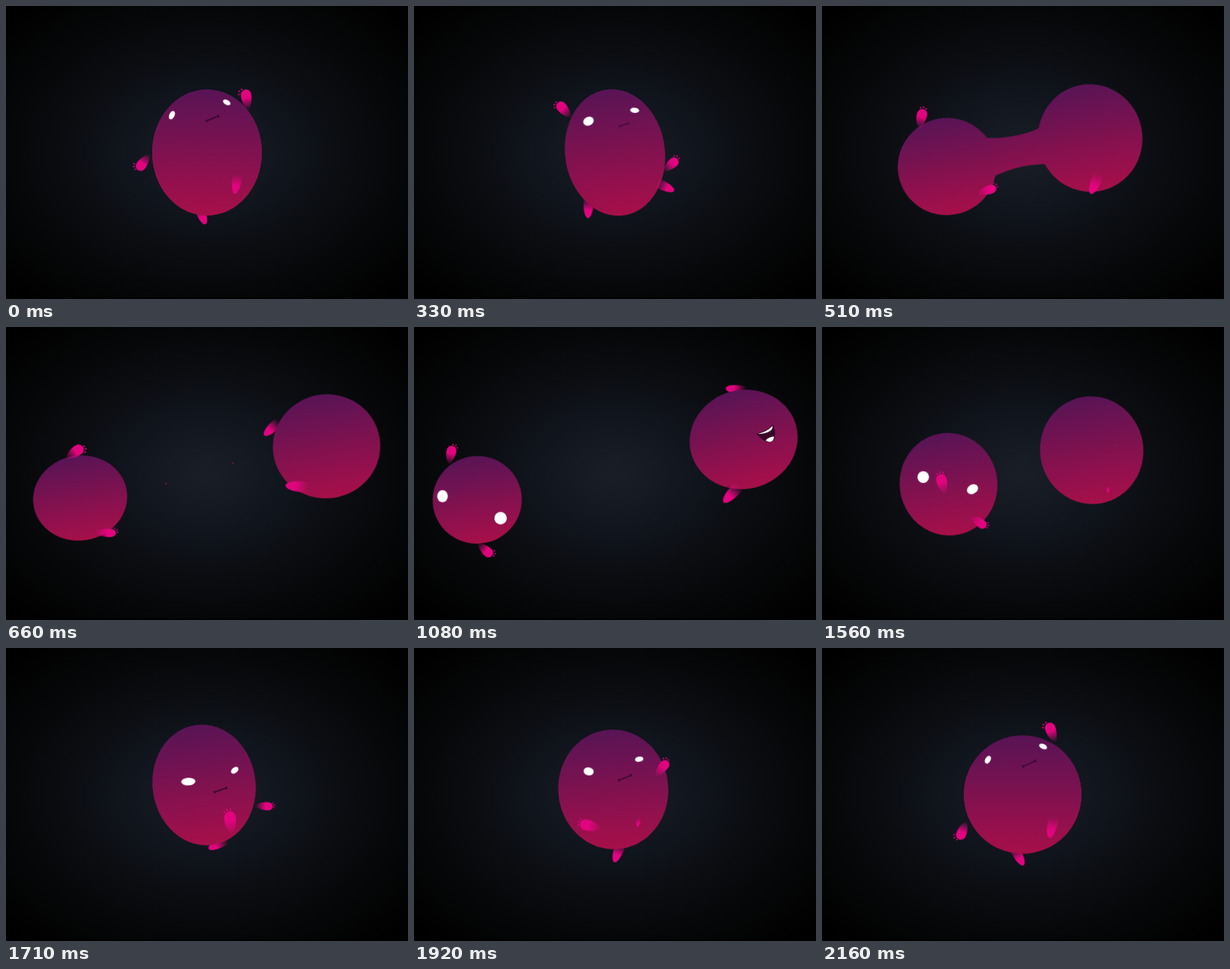
An HTML page without scripts that plays this animation: 550x400 px, repeating every 2190 ms.

```html
<!DOCTYPE html>
<html lang="en">
<head>
<meta charset="utf-8">
<title>Splitting blob</title>
<style>
html, body { margin: 0; width: 100%; height: 100%; overflow: hidden; background: #000; }
svg { display: block; width: 550px; height: 400px;
  background: radial-gradient(ellipse farthest-corner at 50% 50%, #1a1e27 0, #10141c 30%, #0b0d11 48%, #050607 72%, #000 95%); }
svg * { animation: 2.19s linear infinite; }

.left { animation-name: left; }
.right { animation-name: right; }
.bodyL { animation-name: bodyL; }
.bodyR { animation-name: bodyR; }
.arm1 { animation-name: arm1; }
.arm2 { animation-name: arm2; }
.toes1 { animation-name: toes1; }
.toes2 { animation-name: toes2; }
.leg1 { animation-name: leg1; }
.leg2 { animation-name: leg2; }
.eye1 { animation-name: eye1; }
.eye2 { animation-name: eye2; }
.line { animation-name: line; }
.grin { animation-name: grin; }
.drop { animation-name: drop; }

/* blob paths */
@keyframes left {
  0%, 15.07% { transform: translate(275px, 200px); }
  19.18% { transform: translate(258px, 203px); }
  21.92% { transform: translate(203px, 213px); }
  24.66% { transform: translate(141px, 225px); }
  27.4% { transform: translate(114px, 231px); }
  30.14% { transform: translate(101.5px, 233.5px); animation-timing-function: ease-out; }
  49.32% { transform: translate(86.5px, 236px); }
  64.38% { transform: translate(82.5px, 237px); }
  68.49% { transform: translate(102px, 232px); }
  71.23% { transform: translate(172px, 215px); }
  73.97% { transform: translate(236px, 196px); }
  78.08% { transform: translate(271px, 187px); }
  98.63%, 100% { transform: translate(274.5px, 200px); }
}
@keyframes right {
  0%, 15.07% { transform: translate(275px, 200px); }
  19.18% { transform: translate(289px, 197px); }
  21.92% { transform: translate(336px, 187px); }
  24.66% { transform: translate(396px, 174px); }
  27.4% { transform: translate(425px, 167px); }
  30.14% { transform: translate(438.5px, 163px); animation-timing-function: ease-out; }
  49.32% { transform: translate(451px, 153.5px); }
  64.38% { transform: translate(456px, 150.5px); }
  68.49% { transform: translate(437px, 154px); }
  71.23% { transform: translate(370px, 168px); }
  73.97% { transform: translate(311px, 181px); }
  78.08% { transform: translate(271px, 187px); }
  98.63%, 100% { transform: translate(274.5px, 200px); }
}

/* body shapes */
@keyframes bodyL {
  0% { transform: rotate(0deg) scale(.75, .86); }
  15.07% { transform: rotate(-8deg) scale(.68, .865); }
  21.92% { transform: rotate(-10deg) scale(.68, .68); }
  30.14% { transform: rotate(-10deg) scale(.645, .58); }
  49.32%, 64.38% { transform: rotate(-10deg) scale(.61, .598); }
  73.97% { transform: rotate(-10deg) scale(.69, .74); }
  78.08% { transform: rotate(-8deg) scale(.702, .823); }
  98.63%, 100% { transform: rotate(0deg) scale(.805, .805); }
}
@keyframes bodyR {
  0% { transform: rotate(0deg) scale(.75, .86); }
  15.07% { transform: rotate(-8deg) scale(.68, .865); }
  21.92% { transform: rotate(-10deg) scale(.71, .74); }
  30.14% { transform: rotate(-10deg) scale(.735, .71); }
  49.32% { transform: rotate(-14deg) scale(.742, .675); }
  64.38% { transform: rotate(-12deg) scale(.722, .674); }
  73.97% { transform: rotate(-10deg) scale(.7, .76); }
  78.08% { transform: rotate(-8deg) scale(.702, .823); }
  98.63%, 100% { transform: rotate(0deg) scale(.805, .805); }
}

/* limbs, measured from the blob centre */
@keyframes arm1 {
  0% { transform: translate(-79px, 2px) rotate(-145deg) scale(.95); }
  15.07% { transform: translate(-60px, -48px) rotate(-43deg) scale(.95); }
  30.14% { transform: translate(-19.5px, -53.5px) rotate(54deg) scale(1); }
  49.32% { transform: translate(-38.5px, -48px) rotate(10deg) scale(.92); }
  64.38% { transform: translate(-46.5px, -41px) rotate(-28deg) scale(.88); }
  78.08% { transform: translate(38px, 68px) rotate(-5deg) scale(1.12); }
  98.63%, 100% { transform: translate(-77.5px, 36px) rotate(-160deg) scale(.95); }
}
@keyframes arm2 {
  0% { transform: translate(57px, -58px) rotate(-10deg) scale(1); }
  15.07% { transform: translate(67px, 26px) rotate(47deg) scale(.9); }
  30.14% { transform: translate(19px, 47.5px) rotate(90deg) scale(.8, 1.05); }
  49.32% { transform: translate(.5px, 60px) rotate(129deg) scale(.9); }
  64.38% { transform: translate(-9.5px, 60px) rotate(155deg) scale(.9); }
  78.08% { transform: translate(69px, 29px) rotate(91deg) scale(.78, .88); }
  98.63%, 100% { transform: translate(45.5px, -71px) rotate(-22deg) scale(1); }
}
@keyframes toes1 {
  0% { transform: translateY(-20px) rotate(44deg); }
  15.07% { transform: translateY(-20px) rotate(-29deg); }
  30.14%, 64.38% { transform: translateY(-20px) rotate(27deg); }
  78.08% { transform: translateY(-20px) rotate(-15deg); }
  98.63%, 100% { transform: translateY(-20px) rotate(41deg); }
}
@keyframes toes2 {
  0% { transform: translateY(-20px) rotate(-48deg); }
  15.07% { transform: translateY(-20px) rotate(-17deg); }
  30.14%, 64.38% { transform: translateY(-20px) rotate(-28deg); }
  78.08% { transform: translateY(-20px) rotate(-11deg); }
  98.63%, 100% { transform: translateY(-20px) rotate(-36deg); }
}
@keyframes leg1 {
  0% { transform: translate(-12px, 72px) rotate(159deg); }
  15.07% { transform: translate(-36px, 62px) rotate(182deg); }
  30.14% { transform: translate(-65px, -34px) rotate(227deg); }
  49.32% { transform: translate(3px, -66px) rotate(278deg); }
  64.38% { transform: translate(31px, -61px) rotate(321deg); }
  78.08% { transform: translate(31px, 74px) rotate(242deg); }
  98.63%, 100% { transform: translate(-12px, 72px) rotate(152deg); }
}
@keyframes leg2 {
  0% { transform: translate(42px, 30px) rotate(189deg) scale(.95); }
  15.07% { transform: translate(57px, 41px) rotate(115deg) scale(.95); }
  30.14% { transform: translate(-25px, 56px) rotate(275deg) scale(1.12); }
  49.32% { transform: translate(-6px, 63px) rotate(223deg) scale(1.12); }
  64.38% { transform: translate(6px, 61px) rotate(188deg) scale(1.08); }
  73.97%, 80% { transform: translate(30px, 45px) rotate(190deg) scale(0); }
  98.63%, 100% { transform: translate(42.5px, 32px) rotate(192deg) scale(1); }
}

/* faces */
@keyframes eye1 {
  0% { transform: translate(-48px, -51px) rotate(25deg) scale(.36, .61); }
  15.07% { transform: translate(-36px, -43px) rotate(-25deg) scale(.75, .6); }
  22%, 34% { transform: translate(-52px, -12px) rotate(-10deg) scale(0, 0); }
  49.32% { transform: translate(-47.5px, -5px) rotate(0deg) scale(.73, .83); }
  64.38% { transform: translate(-48px, -15px) rotate(17deg) scale(.6, 1.08); }
  78.08% { transform: translate(-21.5px, -4.5px) rotate(-3deg) scale(.97, .53); }
  98.63%, 100% { transform: translate(-47.5px, -47.5px) rotate(28deg) scale(.37, .58); }
}
@keyframes eye2 {
  0% { transform: translate(27px, -68.5px) rotate(30deg) scale(.55, .33); }
  15.07% { transform: translate(27px, -58px) rotate(5deg) scale(.62, .36); }
  22%, 34% { transform: translate(38px, 5px) rotate(0deg) scale(0, 0); }
  49.32% { transform: translate(32px, 25px) rotate(0deg) scale(.85, .85); }
  64.38% { transform: translate(23.5px, 34px) rotate(-25deg) scale(1.02, .88); }
  78.08% { transform: translate(42px, -20px) rotate(-40deg) scale(.58, .38); }
  98.63%, 100% { transform: translate(28px, -65.5px) rotate(25deg) scale(.57, .34); }
}
@keyframes line {
  0% { transform: translate(7.5px, -46.5px) rotate(-22deg) scale(1); }
  15.07% { transform: translate(12px, -38px) rotate(-18deg) scale(.72); }
  21.92%, 72% { transform: translate(30px, -15px) rotate(-20deg) scale(0); }
  78.08% { transform: translate(22.5px, 7px) rotate(-20deg) scale(1); }
  98.63%, 100% { transform: translate(9px, -42px) rotate(-25deg) scale(1.03); }
}
@keyframes grin {
  0%, 34% { transform: translate(20px, -5px) rotate(0deg) scale(0); }
  49.32% { transform: translate(30px, -8.5px) rotate(0deg) scale(1); }
  64.38% { transform: translate(35px, -13.5px) rotate(-3deg) scale(.9); }
  72%, 100% { transform: translate(30px, -5px) rotate(0deg) scale(0); }
}
@keyframes drop {
  0%, 26% { transform: scale(0); }
  26.1% { transform: scale(3); }
  30.14% { transform: scale(1); }
  33%, 100% { transform: scale(0); }
}
</style>
</head>
<body>
<svg viewBox="0 0 550 400">
  <defs>
    <linearGradient id="skin" x1="0" y1="0" x2="0" y2="1">
      <stop offset="0" stop-color="#581455"/>
      <stop offset="1" stop-color="#a70f4a"/>
    </linearGradient>
    <linearGradient id="neck" gradientUnits="userSpaceOnUse" x1="0" y1="-75" x2="0" y2="75">
      <stop offset="0" stop-color="#581455"/>
      <stop offset="1" stop-color="#a70f4a"/>
    </linearGradient>
    <linearGradient id="fade" gradientUnits="userSpaceOnUse" x1="0" y1="0" x2="0" y2="-17">
      <stop offset="0" stop-color="#e2047f" stop-opacity="0"/>
      <stop offset="1" stop-color="#e2047f"/>
    </linearGradient>
    <circle id="body" r="100" fill="url(#skin)"/>
    <path id="arm" fill="url(#fade)" d="M0 0C-5-5-8-14-7-22C-6-30 5-31 7-23C8-15 4-5 0 0Z"/>
    <path id="leg" fill="url(#fade)" d="M-6 0C-8-12-5-28 0-28C5-28 8-12 6 0Z"/>
    <g id="toes" fill="#e2047f">
      <ellipse cx="-4" cy="-9.6" rx=".9" ry="1.4"/>
      <ellipse cy="-11.2" rx=".9" ry="1.5"/>
      <ellipse cx="4" cy="-9.8" rx=".9" ry="1.4"/>
    </g>
    <circle id="eye" r="10" fill="#fff"/>
  </defs>

  <rect y="398" width="550" height="2"/>

  <g class="right"><use href="#leg" class="leg1"/></g>

  <g transform="translate(270 198) rotate(-11.7)">
    <path fill="url(#neck)" d="M0 0Q0 0 0 0L0 0Q0 0 0 0Z">
      <animate attributeName="d" dur="2.19s" repeatCount="indefinite"
        keyTimes="0;.164;.192;.219;.247;.261;.274;1"
        values="M0 0Q0 0 0 0L0 0Q0 0 0 0Z;
          M0 0Q0 0 0 0L0 0Q0 0 0 0Z;
          M-15-70Q0-70 15-70L15 70Q0 70-15 70Z;
          M-66-60Q0-20 66-60L66 60Q0 20-66 60Z;
          M-129-44Q0 36 129-44L129 44Q0-36-129 44Z;
          M-145-28Q0 27 145-28L145 28Q0-27-145 28Z;
          M-150 0Q0 0 150 0L150 0Q0 0-150 0Z;
          M0 0Q0 0 0 0L0 0Q0 0 0 0Z"/>
    </path>
  </g>
  <g fill="#a10f45">
    <g transform="translate(219 214)"><circle class="drop" r="1.1"/></g>
    <g transform="translate(310.5 186)"><circle class="drop" r="1.1"/></g>
    <g transform="translate(250 204)"><circle class="drop" r=".4"/></g>
  </g>

  <g class="right"><use href="#body" class="bodyR"/></g>
  <g class="left">
    <use href="#body" class="bodyL"/>
    <use href="#eye" class="eye1"/>
    <use href="#eye" class="eye2"/>
  </g>
  <g class="right">
    <path class="line" d="M-9 0H9M-9-2V2M9-2V2" fill="none" stroke="#2b0529" stroke-width="1.3"/>
    <g class="grin">
      <path fill="#3b0628" stroke="#1d0318" d="M-12 1Q2-2 10-11Q14 0 11 9Q5 14-1 10Q-6 7-12 1Z"/>
      <path fill="#fff" d="M-11 1Q2-2 9.500-10Q10-5 6-3Q0 1-11 1Z"/>
      <path fill="#fff" d="M0 10Q4 5 11.500 4.500Q11.500 10 7.500 11.500Q3 12.500 0 10Z"/>
    </g>
    <use href="#leg" class="leg2"/>
  </g>
  <g class="left">
    <g class="arm1"><use href="#arm"/><g class="toes1"><use href="#toes"/></g></g>
    <g class="arm2"><use href="#arm"/><g class="toes2"><use href="#toes"/></g></g>
  </g>
</svg>
</body>
</html>
```
